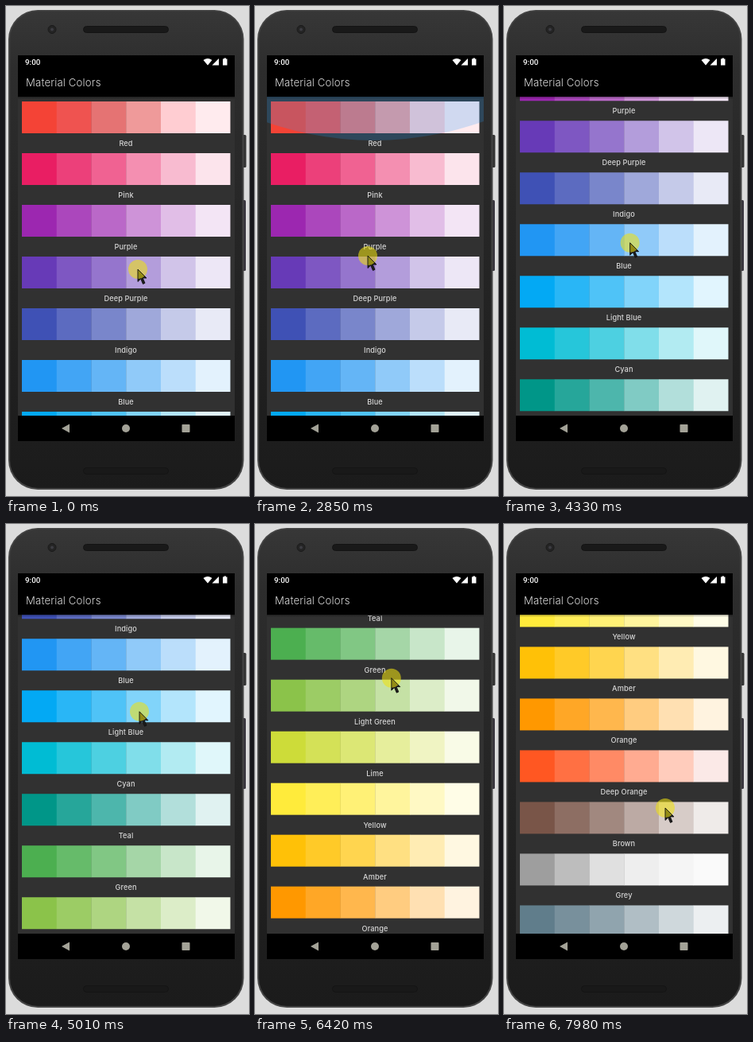
An HTML page for the animation above (8 s loop, 306 by 616 pixels).

```html
<!DOCTYPE html>
<html lang="en">
<head>
<meta charset="utf-8">
<title>Material Colors</title>
<style>
  html, body { margin: 0; width: 100%; height: 100%; overflow: hidden; background: #dcdcdc; }
  svg { display: block; width: 100%; height: 100%; }
  .label { font: 500 9.2px Inter, "Open Sans", sans-serif; letter-spacing: .1px; fill: #d6d6d6; text-anchor: middle; }
  .title { font: 300 13.2px Inter, "Open Sans", sans-serif; letter-spacing: .15px; fill: #d8d8d8; }
  .clock { font: 500 9.8px Roboto, sans-serif; fill: #fff; }
</style>
</head>
<body>
<svg viewBox="0 0 306 616" xmlns="http://www.w3.org/2000/svg">
  <defs>
    <linearGradient id="body" x2="0" y2="1">
      <stop offset="0" stop-color="#373737"/>
      <stop offset=".12" stop-color="#2d2d2d"/>
      <stop offset=".6" stop-color="#232323"/>
      <stop offset="1" stop-color="#1b1b1b"/>
    </linearGradient>
    <linearGradient id="shade" x2="0" y2="1">
      <stop offset="0" stop-opacity=".35"/>
      <stop offset="1" stop-opacity="0"/>
    </linearGradient>
    <clipPath id="view"><rect x="15" y="114" width="273" height="401"/></clipPath>
  </defs>

  <!-- phone -->
  <rect x="297" y="162" width="5.5" height="41" rx="1.5" fill="#333"/>
  <rect x="297" y="244" width="5" height="89" rx="1.5" fill="#38353d"/>
  <rect x="3" y="5" width="296.5" height="603" rx="37" fill="#444"/>
  <rect x="5" y="6.5" width="292.5" height="599.5" rx="35" fill="url(#body)"/>
  <circle cx="58" cy="29.5" r="5" fill="#242424" stroke="#1a1a1a"/>
  <circle cx="58" cy="29.5" r="2" fill="#3c3c42"/>
  <g fill="#191919" stroke="#141414">
    <rect x="97.5" y="25.5" width="107" height="8" rx="4"/>
    <rect x="97.5" y="580.5" width="107" height="8" rx="4"/>
  </g>

  <!-- screen -->
  <rect x="15" y="62" width="273" height="485"/>
  <rect x="15" y="114" width="273" height="401" fill="#313131"/>
  <g clip-path="url(#view)">
    <g id="list"></g>
    <rect x="15" y="114" width="273" height="3" fill="url(#shade)"/>
    <ellipse id="glow" rx="410" fill="#2196f3"/>
  </g>
  <text class="clock" x="24" y="73.5">9:00</text>
  <g fill="#fff">
    <path d="M248.5 68Q254 64 259.500 68L254 74.500Z"/>
    <path d="M268 66V74.500H259.500Z"/>
    <path d="M273 66.500H274.500V65.500H277V66.500H278.500V74.500H273Z"/>
  </g>
  <text class="title" x="25" y="101">Material Colors</text>
  <g fill="#a3a297">
    <path d="M70 531L80 525.500V536.500Z"/>
    <circle cx="151" cy="531" r="5"/>
    <rect x="221.500" y="526" width="10" height="10" rx=".8"/>
  </g>

  <!-- pointer -->
  <g id="pointer">
    <path id="arrow" d="M0 0V15.500L3.700 12L6.500 18.500L9 17.300L6.200 11H11Z"/>
    <circle r="12" fill="#f0e10f" fill-opacity=".57"/>
    <path d="M0 0V15.500L3.700 12L6.500 18.500L9 17.300L6.200 11H11Z" fill="none" stroke="#111" stroke-width=".9"/>
  </g>
</svg>
<script>
const LOOP = 8000, TOP = 120, PITCH = 65, ROW = 40, COL = 43.75;

const palette = {
  "Red": "f44336 ef5350 e57373 ef9a9a ffcdd2 ffebee",
  "Pink": "e91e63 ec407a f06292 f48fb1 f8bbd0 fce4ec",
  "Purple": "9c27b0 ab47bc ba68c8 ce93d8 e1bee7 f3e5f5",
  "Deep Purple": "673ab7 7e57c2 9575cd b39ddb d1c4e9 ede7f6",
  "Indigo": "3f51b5 5c6bc0 7986cb 9fa8da c5cae9 e8eaf6",
  "Blue": "2196f3 42a5f5 64b5f6 90caf9 bbdefb e3f2fd",
  "Light Blue": "03a9f4 29b6f6 4fc3f7 81d4fa b3e5fc e1f5fe",
  "Cyan": "00bcd4 26c6da 4dd0e1 80deea b2ebf2 e0f7fa",
  "Teal": "009688 26a69a 4db6ac 80cbc4 b2dfdb e0f2f1",
  "Green": "4caf50 66bb6a 81c784 a5d6a7 c8e6c9 e8f5e9",
  "Light Green": "8bc34a 9ccc65 aed581 c5e1a5 dcedc8 f1f8e9",
  "Lime": "cddc39 d4e157 dce775 e6ee9c f0f4c3 f9fbe7",
  "Yellow": "ffeb3b ffee58 fff176 fff59d fff9c4 fffde7",
  "Amber": "ffc107 ffca28 ffd54f ffe082 ffecb3 fff8e1",
  "Orange": "ff9800 ffa726 ffb74d ffcc80 ffe0b2 fff3e0",
  "Deep Orange": "ff5722 ff7043 ff8a65 ffab91 ffccbc fbe9e7",
  "Brown": "795548 8d6e63 a1887f bcaaa4 d7ccc8 efebe9",
  "Grey": "9e9e9e bdbdbd e0e0e0 eeeeee f5f5f5 fafafa",
  "Blue Grey": "607d8b 78909c 90a4ae b0bec5 cfd8dc eceff1"
};

// Keys are [time, value, ...]
const scrollKeys = [[0, 0], [3050, 0], [3620, 63], [4100, 150], [4650, 200], [5010, 300.5],
  [5300, 370], [5900, 419], [6400, 570], [7000, 667], [7400, 765], [7980, 810.5], [8000, 812]];
const glowKeys = [[0, 0], [250, 1], [450, .8], [780, 0], [1360, 0], [1820, .95], [2000, 1],
  [2450, 0], [2520, 0], [2850, 1], [3100, 0], [8000, 0]];
const pointerKeys = [[0, 166, 331], [250, 160, 375], [830, 149, 215], [1170, 149, 234],
  [1360, 149, 234], [1820, 139, 304], [2000, 138, 314], [2450, 147, 235], [2850, 142, 314],
  [3050, 142, 316], [3620, 143, 271], [3850, 145, 220], [4600, 165, 330], [5010, 168, 236],
  [5250, 168, 200], [5900, 170, 309], [6350, 172, 190], [7000, 167, 300], [7400, 175, 200],
  [7980, 203, 357], [8000, 203, 356]];

// Monotone cubic interpolation through the keys
function sample(keys, t, k = 1) {
  let i = 0;
  while (i < keys.length - 2 && t >= keys[i + 1][0]) i++;
  const slope = j => keys[j] && keys[j + 1]
    ? (keys[j + 1][k] - keys[j][k]) / (keys[j + 1][0] - keys[j][0]) : 0;
  const tangent = j => {
    const a = slope(j - 1), b = slope(j);
    return a * b > 0 ? 2 * a * b / (a + b) : 0;
  };
  const span = keys[i + 1][0] - keys[i][0], u = (t - keys[i][0]) / span, v = 1 - u;
  return keys[i][k] * v * v * (1 + 2 * u) + keys[i + 1][k] * u * u * (3 - 2 * u)
    + span * u * v * (tangent(i) * v - tangent(i + 1) * u);
}

const [list, glow, pointer, arrow] =
  ["list", "glow", "pointer", "arrow"].map(id => document.getElementById(id));

list.innerHTML = Object.entries(palette).map(([name, shades], i) => {
  const y = TOP + i * PITCH;
  const cells = shades.split(" ").map((c, j) =>
    `<rect x="${20 + j * COL}" y="${y}" width="${j < 5 ? COL + .3 : COL}" height="${ROW}" fill="#${c}"/>`);
  return cells.join("") + `<text class="label" x="151" y="${y + 56}">${name}</text>`;
}).join("");

function draw(now) {
  const t = now % LOOP;
  const scroll = sample(scrollKeys, t), pull = sample(glowKeys, t);
  const x = sample(pointerKeys, t, 1), y = sample(pointerKeys, t, 2);

  list.setAttribute("transform", `translate(0 ${-scroll})`);

  glow.setAttribute("cx", 151.5 + (x - 151.5) * .2);
  glow.setAttribute("cy", 114 - 355 * pull);
  glow.setAttribute("ry", 410 * pull);
  glow.setAttribute("opacity", .21 * Math.min(1, pull * 1.1));

  // The arrow is dark over swatches and light over the gaps
  const phase = (y + 5 + scroll - TOP + PITCH) % PITCH;
  arrow.setAttribute("fill", phase < ROW ? "#1c1c1c" : "#f4f0e4");
  pointer.setAttribute("transform", `translate(${x} ${y})`);
  requestAnimationFrame(draw);
}
requestAnimationFrame(draw);
</script>
</body>
</html>
```
